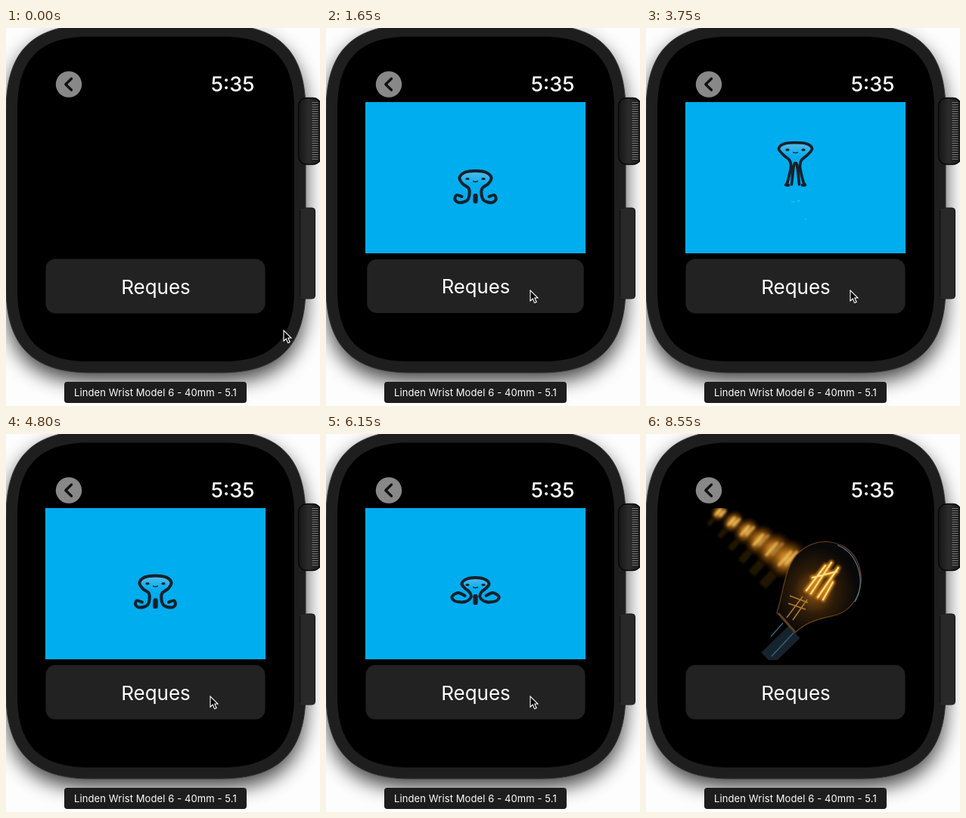
An HTML page that plays this animation: 415x500 px, repeating every 9150 ms.

```html
<!DOCTYPE html>
<html lang="en">
<head>
<meta charset="utf-8">
<title>Watch simulator</title>
<style>
html, body { margin: 0; width: 100%; height: 100%; overflow: hidden; background: #fff; }
svg { display: block; width: 415px; height: 500px; }
text { font-family: Inter, Roboto, sans-serif; fill: #fff; }
</style>
</head>
<body>
<svg viewBox="0 0 415 500">
  <defs>
    <filter id="shade" x="-30%" y="-30%" width="160%" height="160%"><feGaussianBlur stdDeviation="13"/></filter>
    <filter id="soft" x="-50%" y="-50%" width="200%" height="200%"><feGaussianBlur stdDeviation="1.6"/></filter>
    <linearGradient id="head" x1="0" y1="0" x2="0" y2="1">
      <stop offset="0" stop-color="#55bdea"/><stop offset=".8" stop-color="#00adee"/>
    </linearGradient>
    <linearGradient id="crown">
      <stop offset="0" stop-color="#151515"/><stop offset=".45" stop-color="#2c2c2c"/><stop offset="1" stop-color="#181818"/>
    </linearGradient>
    <radialGradient id="glow">
      <stop offset="0" stop-color="#ffd36b"/><stop offset=".35" stop-color="#dc8a1c"/>
      <stop offset=".7" stop-color="#6b3a08" stop-opacity=".7"/><stop offset="1" stop-color="#2a1602" stop-opacity="0"/>
    </radialGradient>
    <radialGradient id="glass" cx=".45" cy=".55">
      <stop offset="0" stop-color="#8a5515"/><stop offset=".5" stop-color="#2e1b08"/><stop offset="1" stop-color="#080808"/>
    </radialGradient>
    <clipPath id="frame"><path d="M52 98H343V299H52Z"/></clipPath>
    <path id="case" d="M0 110C0 32 34 -4 112 -4H284C362 -4 396 32 396 110V343C396 420 361 456 284 456H112C35 456 0 420 0 343Z"/>
  </defs>

  <rect width="415" height="500" fill="#fdfdfd"/>
  <use href="#case" y="12" filter="url(#shade)" opacity=".72"/>
  <rect x="389" y="238" width="19.5" height="120" rx="4" fill="#292929" stroke="#151515"/>
  <use href="#case" fill="#1e1e1f" stroke="#343436"/>
  <path d="M15 107C15 42 44 11.500 109 11.500H287C352 11.500 381 42 381 107V346C381 411 352 441 287 441H109C44 441 15 411 15 346Z"/>
  <path d="M389 241V355" stroke="#111" stroke-width="1.500"/>
  <path d="M389.500 239H404Q408 239 408 243V354Q408 358 404 358H389.500Z" fill="#292929"/>
  <rect x="386.500" y="92.500" width="30" height="88" rx="11" fill="url(#crown)" stroke="#080808" stroke-width="1.500"/>
  <path d="M408.500 98V176" stroke="#777" stroke-width="8" stroke-dasharray="1 2"/>

  <circle cx="83" cy="74.500" r="17.200" fill="#888"/>
  <path d="M86.500 67L78.800 74.500L86.500 82" fill="none" stroke="#101010" stroke-width="3.400" stroke-linecap="round" stroke-linejoin="round"/>
  <text x="328.500" y="83.800" font-size="27" font-weight="500" text-anchor="end">5:35</text>

  <g id="scene">
    <rect x="52" y="98" width="291" height="200" fill="#00adee"/>
    <path id="drops" fill="none" stroke="#52c4f2" stroke-width="1.200" opacity=".8"/>
    <g transform="translate(197.500 0)">
      <path id="skull" fill="url(#head)"/>
      <path id="body" fill="none" stroke="#16202a" stroke-width="4" stroke-linecap="round" stroke-linejoin="round"/>
      <g id="face" fill="#16202a">
        <ellipse cx="-10.500" rx="2.700" ry="1.600"/>
        <ellipse cx="10.500" rx="2.700" ry="1.600"/>
        <path d="M-3.500 3.200Q0 4.700 3.500 3.200" fill="none" stroke="#16202a" stroke-width="1.400"/>
      </g>
    </g>
  </g>

  <g id="photo" clip-path="url(#frame)">
    <g id="row" filter="url(#soft)"></g>
    <path d="M196 262L160 297" stroke="#17232c" stroke-width="22"/>
    <path d="M195 263L166 294M181 250L165 268" stroke="#34617d" stroke-width="1.500"/>
    <path d="M173 236C182 210 182 180 199 160C223 133 263 139 278 166C292 194 281 228 253 239C229 245 213 247 197 263Z" fill="url(#glass)" stroke="#694317" stroke-width="1.200"/>
    <path d="M253 147C280 158 292 194 276 222" fill="none" stroke="#52738c" stroke-width="1.300"/>
    <path d="M175 237L197 262" stroke="#5d4020" stroke-width="3"/>
    <path d="M186 243L207 215M194 246L213 219M188 224L211 232M190 214L214 223" stroke="#b07b2c" stroke-width="1.500"/>
    <path id="wire" fill="none" stroke-linecap="round" d="M212 207L237 174M218 211L245 170M227 216L254 177M234 219L247 196M220 190L252 182"/>
    <use href="#wire" stroke="#d68518" stroke-width="6" filter="url(#soft)"/>
    <use href="#wire" stroke="#ffe08a" stroke-width="2.200"/>
  </g>

  <g id="button">
    <rect x="52.500" y="305.500" width="290" height="72" rx="13" fill="#222223"/>
    <text x="198" y="351.500" font-size="26" text-anchor="middle">Reques</text>
  </g>

  <rect x="77" y="468" width="241" height="28" rx="4" fill="#1d1d1e"/>
  <text x="197.500" y="487" font-size="13" text-anchor="middle" letter-spacing=".1">Linden Wrist Model 6 - 40mm - 5.1</text>
  <path id="cursor" d="M0 0V14L3.300 11L5.700 16.600L8.200 15.500L5.800 10H10Z" fill="#000" stroke="#fff" stroke-width="1.100"/>
</svg>
<script>
const LOOP = 9150, STEP = 150, HOP = 1560;
const SHOW = 1650, SWAP = 7200, LEAVE = 8250;
const $ = id => document.getElementById(id);
const mix = (a, b, k) => a + (b - a) * k;
const smooth = k => k * k * (3 - 2 * k);

// Left half of the octopus: x from the middle, y on the stage.
// The last two points are the inner leg.
const POSES = {
  squat: [[0,190],[-12,192],[-18,198],[-14,204],[-8,209],[-6,216],[-14,222],[-27,221],[-31,215],[-23,210],[-14,214],[-1,214],[-1,224]],
  stand: [[0,189],[-14,191],[-21,198],[-17,206],[-9,212],[-8,220],[-11,228],[-21,231],[-27,227],[-25,221],[-18,223],[-1,221],[-1,230]],
  leap: [[0,152],[-15,153.500],[-22,160],[-16,168],[-8,175],[-6,182],[-7,190],[-9,198],[-11,205],[-13,208],[-9,208],[-1,179],[-5,207]]
};
// Phase in ms and stretch: -1 squat, 0 stand, 1 leap
const KEYS = [[0,0],[40,.05],[180,-1.05],[290,.2],[390,.95],[640,1.04],[900,.95],[1060,0],[1260,-.9],[1380,-1],[HOP,0]];

function stretch(ph) {
  const i = KEYS.findIndex(k => k[0] > ph);
  const [a, b] = [KEYS[i - 1], KEYS[i]];
  return mix(a[1], b[1], smooth((ph - a[0]) / (b[0] - a[0])));
}

function pose(s) {
  const to = s < 0 ? POSES.squat : POSES.leap;
  return POSES.stand.map((p, i) => p.map((v, j) => mix(v, to[i][j], Math.abs(s))));
}

// Smooth curve through points; flip = -1 mirrors it
function curve(pts, flip) {
  const xy = (x, y) => (x * flip).toFixed(2) + " " + y.toFixed(2);
  let d = "M" + xy(...pts[0]);
  for (let i = 0; i < pts.length - 1; i++) {
    const b = pts[i], c = pts[i + 1], e = pts[i + 2] || c;
    const a = i ? pts[i - 1] : [-c[0], c[1]];
    d += "C" + xy(b[0] + (c[0] - a[0]) / 6, b[1] + (c[1] - a[1]) / 6) + " " +
      xy(c[0] - (e[0] - b[0]) / 6, c[1] - (e[1] - b[1]) / 6) + " " + xy(...c);
  }
  return d;
}

function drawOctopus(ph) {
  const s = stretch(ph), pts = pose(s);
  const side = pts.slice(0, 11), leg = pts.slice(11), top = pts.slice(0, 5);
  $("body").setAttribute("d", [1, -1].map(f => curve(side, f) + curve(leg, f)).join(""));
  $("body").setAttribute("stroke-width", mix(4, 3.7, Math.max(0, s)));
  $("skull").setAttribute("d", [1, -1].map(f => curve(top, f) + "H0Z").join(""));

  // One full turn in the air
  const turn = ph > 540 && ph < 900 ? (ph - 540) / 360 * Math.PI * 2 : 0;
  const c = Math.cos(turn);
  $("face").setAttribute("transform", `translate(${14 * Math.sin(turn)} ${pts[2][1] + 1.5}) scale(${Math.max(c, .01)} 1)`);
  $("face").style.display = c > .1 ? "" : "none";

  const wet = ph > 300 && ph < 900, y = 253 - (ph - 540) * .085;
  $("drops").style.display = wet ? "" : "none";
  $("drops").setAttribute("d", ph < 640
    ? `M192 ${y - 23}h4M200 ${y - 24}l4 -1M210 ${y}h2`
    : `M199 ${y - 20}h3M205 ${y}h2`);
}

function cursorAt(t) {
  if (t >= LEAVE) {
    const k = (t - LEAVE + STEP) / 300;
    return [mix(270, 359, k), mix(347, 475, k)];
  }
  const k = smooth(Math.min(1, Math.max(0, (t - 450) / 750)));
  return [mix(367, 270, k), mix(400, 347, k)];
}

function buildRow() {
  let out = "";
  for (let i = 0; i < 6; i++) {
    const k = i / 5, x = mix(97, 186, k), y = mix(104, 165, k), r = mix(11, 24, k);
    out += `<g transform="translate(${x} ${y}) rotate(-48)">
      <ellipse rx="${r * 1.25}" ry="${r}" fill="url(#glow)" opacity=".8"/>
      <path d="M${-r * .6} -2H${r * .5}M${-r * .3} 4H${r * .7}" stroke="#ffc65a" stroke-width="2.5"/>
      <path d="M${-r * 2} 0H${-r * 1.1}" stroke="#3a2508" stroke-width="${r * .5}" opacity=".6"/></g>`;
  }
  $("row").innerHTML = out;
}

function draw(time) {
  const t = Math.floor(time % LOOP / STEP) * STEP;
  const dancing = t >= SHOW && t < SWAP;
  $("scene").style.display = dancing ? "" : "none";
  $("photo").style.display = t >= SWAP ? "" : "none";
  if (dancing) drawOctopus((t - SHOW) % HOP);
  $("button").setAttribute("transform", t === SHOW ? "translate(197.500 341.500) scale(.988) translate(-197.500 -341.500)" : "");
  $("cursor").style.display = t < LEAVE + 2 * STEP ? "" : "none";
  $("cursor").setAttribute("transform", `translate(${cursorAt(t).join(" ")})`);
}

buildRow();
const start = performance.now();
function tick() {
  draw(performance.now() - start);
  requestAnimationFrame(tick);
}
tick();
</script>
</body>
</html>
```
